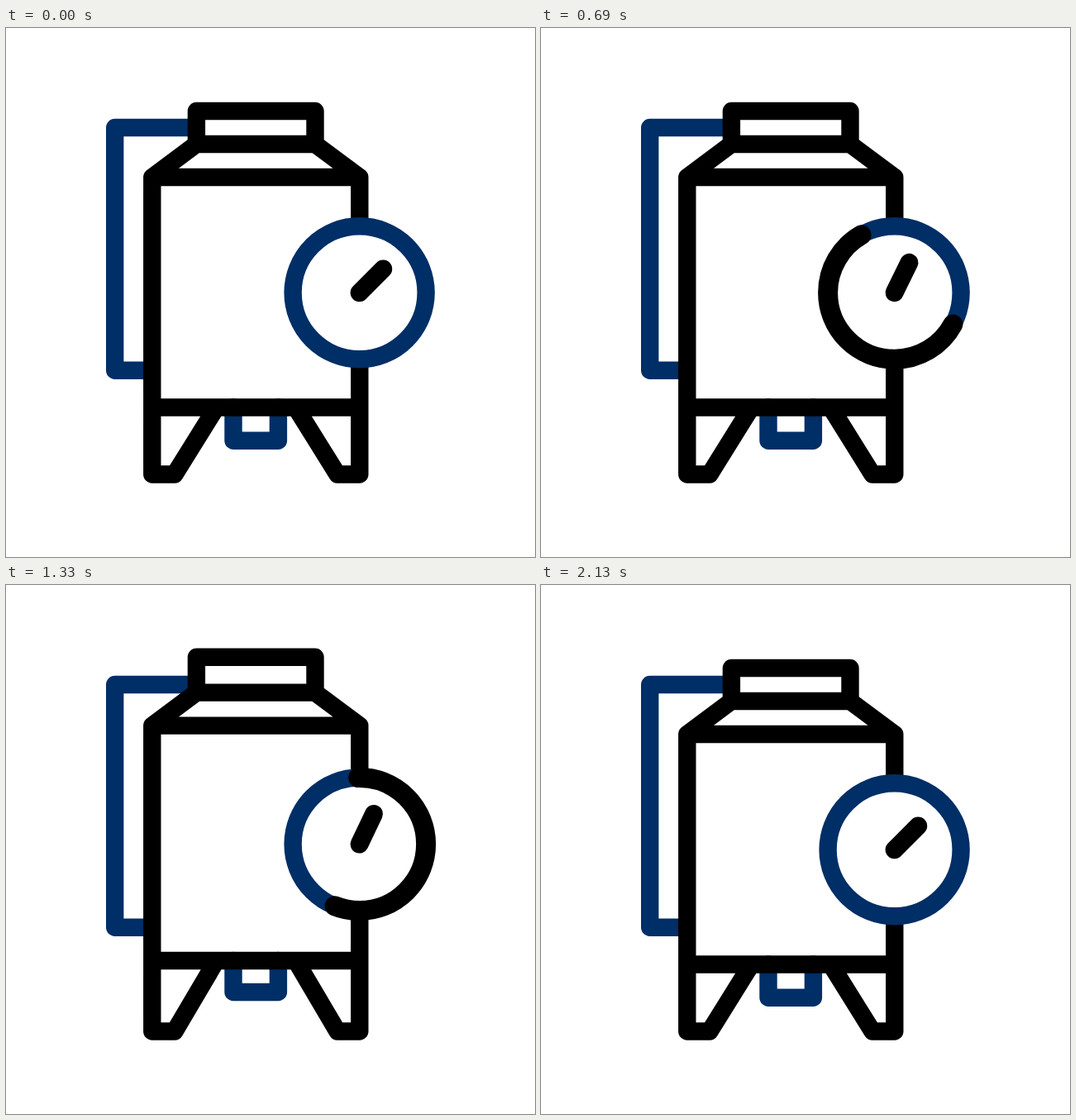
Animation, 640 px wide and 640 px high, one loop 2.27 s. Source, as an HTML page:

```html
<!DOCTYPE html>
<html lang="en">
<head>
<meta charset="utf-8">
<title>Tank with gauge</title>
<style>
  html, body { margin: 0; width: 100%; height: 100%; overflow: hidden; background: #fff; }
  svg { display: block; width: 100%; height: 100%; }
  path, circle { fill: none; stroke: #000; stroke-width: 21.4; stroke-linecap: round; stroke-linejoin: round; }
  .blue { stroke: #002e66; }
  .dial { fill: #fff; }
  .arc { stroke-width: 24; }
  .needle { stroke-width: 22; }
</style>
</head>
<body>
<svg viewBox="0 0 640 640">
  <path class="blue" d="M230 120.5H131.7V414.3H176"/>
  <path class="blue" id="outlet"/>
  <path id="tank"/>
  <g id="gauge">
    <circle class="blue dial" r="80.5"/>
    <circle class="arc" r="80.5" pathLength="360" transform="rotate(-90)"/>
    <circle class="arc" r="80.5" pathLength="360" transform="rotate(-90)"/>
    <path class="needle" id="needle" d="M0 0V-40.5"/>
  </g>
</svg>
<script>
const LOOP = 2270, STEP = 40;
const FIRST = 3, LAST = 51, BOUNCE = 12;
const $ = id => document.getElementById(id);
const arcs = document.querySelectorAll('.arc');
const progress = (x, a, b) => Math.min(1, Math.max(0, (x - a) / (b - a)));

// Both arcs chase round the dial: one anticlockwise, then one clockwise.
const sweeps = [
  { begin: 6.4, end: 26.3, angle: 320, turn: -505, ease: 0.9, recoil: 0.2 },
  { begin: 25, end: 43.2, angle: 19, turn: 394, ease: 1.56, recoil: 0.7 }
];

// The loop pauses shortly after its start and again at its end.
function stepAt(ms) {
  if (ms < 170) return ms < 40 ? 0 : 1;
  return Math.min(LAST, 2 + Math.floor((ms - 170) / STEP));
}

function liftAt(step) {
  if (step < FIRST) return 0;
  const phase = (step - FIRST) % BOUNCE / BOUNCE;
  return Math.pow(1 - Math.abs(2 * phase - 1), 0.75);
}

// The needle sinks softly, then climbs back past its rest angle and settles.
function needleAt(step) {
  const rest = 45, dip = 23, turn = 22.5;
  if (step < turn) return rest - dip * Math.sin(progress(step, FIRST, turn) * Math.PI / 2);
  const v = progress(step, turn, LAST);
  return rest - dip + dip * (v ** 2 + 11 * v ** 4 * (1 - v));
}

function drawBody(lift) {
  const lid = 100.5 - 18 * lift;
  const neck = 140.5 - 14 * lift;
  const top = 180.5 - 14 * lift;
  const floor = 459 - 6.2 * lift;
  const outlet = 499.2 - 9.1 * lift;
  $('outlet').setAttribute('d', `M275 ${floor}V${outlet}H329.4V${floor}`);
  $('tank').setAttribute('d',
    `M230.4 ${neck}V${lid}H374V${neck}Z` +
    `M230.4 ${neck}L176.8 ${top}H427.8L374 ${neck}` +
    `M176.8 ${top}V540H204L254.5 ${floor}` +
    `M427.8 ${top}V540H401L350.5 ${floor}` +
    `M176.8 ${floor}H427.8`);
  $('gauge').setAttribute('transform', `translate(427.6 ${320.2 - 9 * lift})`);
}

// The tail recoils a little before it rushes after the head.
function drawArc(el, { begin, end, angle, turn, ease, recoil }, step) {
  const u = progress(step, begin, end);
  const head = angle + turn * (1 - (1 - u) ** ease);
  const tail = angle + turn * (u ** 8 - recoil * u * u * (1 - u));
  const span = Math.abs(head - tail);
  el.style.display = span > 0.5 ? '' : 'none';
  el.setAttribute('stroke-dasharray', `${span} ${360 - span}`);
  el.setAttribute('stroke-dashoffset', -Math.min(head, tail));
}

const start = performance.now();
function draw() {
  const step = stepAt((performance.now() - start) % LOOP);
  drawBody(liftAt(step));
  sweeps.forEach((sweep, i) => drawArc(arcs[i], sweep, step));
  $('needle').setAttribute('transform', `rotate(${needleAt(step)})`);
  requestAnimationFrame(draw);
}
draw();
</script>
</body>
</html>
```
